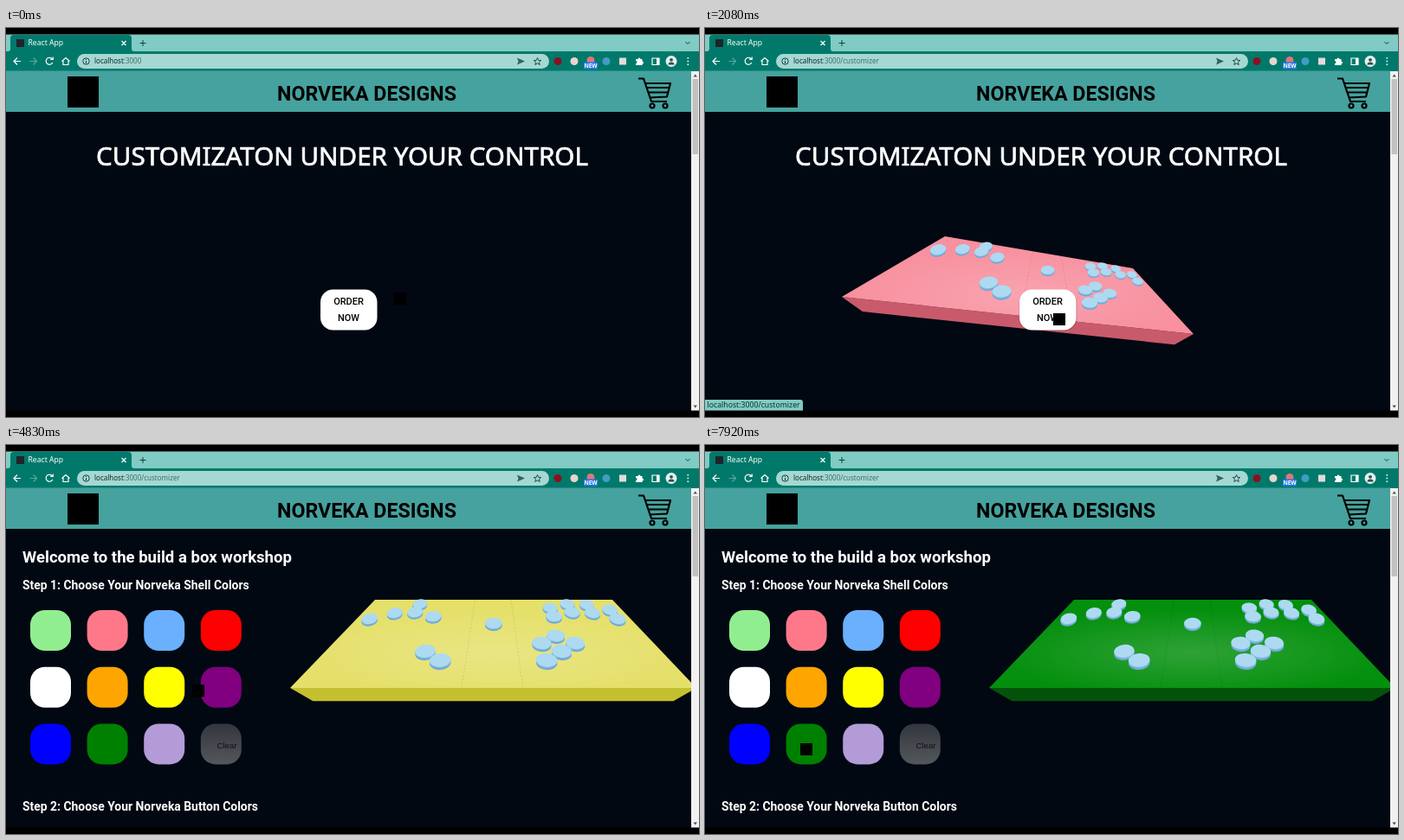
Recreate the animation shown at these times as an HTML page. Size 800 px wide and 450 px high, loop 8 s.

```html
<!DOCTYPE html>
<html lang="en">
<head>
<meta charset="utf-8">
<title>Customizer demo</title>
<style>
html, body { margin: 0; height: 100%; overflow: hidden; background: #000 }
svg { display: block; width: 100vw; height: 100vh }
.ui { font-family: "Noto Sans", sans-serif }
.head { font: 700 13.92px Roboto, sans-serif; fill: #fff }
.order { font: 500 11px Roboto, sans-serif; text-anchor: middle }
.hero { font: 29.6px "Noto Sans", sans-serif; text-anchor: middle; fill: #fff; stroke: #fff; stroke-width: .7 }
.line { fill: none; stroke: #fff; stroke-width: 1.2 }
</style>
</head>
<body>
<svg viewBox="0 0 800 450">
  <defs>
    <linearGradient id="grey" x2="0" y2="1"><stop stop-color="#33363c"/><stop offset="1" stop-color="#54575c"/></linearGradient>
    <radialGradient id="glow" cy=".6"><stop stop-color="#fff" stop-opacity=".17"/><stop offset="1" stop-color="#fff" stop-opacity="0"/></radialGradient>
    <clipPath id="page"><path d="M0 97H791V443H0z"/></clipPath>
  </defs>

  <!-- browser -->
  <path fill="#80cbc4" d="M0 7.500H800V28H0z"/>
  <path fill="#00796b" d="M0 27H800V50H0zM2 27q3 0 3-3V12q0-4 4-4H141q4 0 4 4v12q0 3 3 3z"/>
  <rect x="12" y="13" width="9" height="9" fill="#20232a"/>
  <g class="ui">
    <text x="25.500" y="20.300" font-size="8.600" fill="#fff">React App</text>
    <rect x="82" y="30" width="545" height="17" rx="8.500" fill="#a5d8d3"/>
    <text x="102" y="41.300" font-size="8" fill="#0b2b28">localhost<tspan fill="#41706b">:3000<tspan id="path">/customizer</tspan></tspan></text>
  </g>
  <path class="line" d="M133.500 15l5 5m0-5l-5 5M17 38.500H9m4-4l-4 4 4 4M53.500 36a4 4 0 1 0 .3 4M54.200 33.500v3h-3M64.500 38.500l4.500-4 4.500 4M66 38v4.500h6V38"/>
  <path class="line" opacity=".35" d="M27.500 38.500h8m-4-4l4 4-4 4"/>
  <g fill="none" stroke="#17403c">
    <path d="M154.500 17.500h7m-3.500-3.500v7M784.500 16l2.500 2.500 2.500-2.500M92.500 38v3m0-5v1"/>
    <circle cx="92.500" cy="38.500" r="3.700"/>
    <path stroke-width=".9" d="M613.500 34.500l1.200 2.800 3 .2-2.300 2 .8 3-2.700-1.600-2.700 1.600.8-3-2.300-2 3-.2z"/>
  </g>
  <path fill="#35635f" d="M590 34.500l9 4-9 4 1.500-4z"/>
  <circle cx="637" cy="38.500" r="4.500" fill="#8c1020"/>
  <circle cx="656" cy="38.500" r="4.500" fill="#e8d5cd"/>
  <circle cx="675" cy="37.500" r="4.500" fill="#dc7777"/>
  <rect x="667" y="39.500" width="16" height="8" rx="1" fill="#2878e8"/>
  <text x="675" y="46" font-size="6.500" font-weight="700" text-anchor="middle" fill="#fff" class="ui">NEW</text>
  <circle cx="693" cy="38.500" r="4.500" fill="#439bc4"/>
  <rect x="708" y="34.500" width="8" height="8" fill="#e5d9dc"/>
  <path fill="#fff" d="M727 36h2.500a1.500 1.500 0 0 1 3 0h2v2.500a1.500 1.500 0 0 1 0 3V43h-7.500v-2a1.500 1.500 0 0 0 0-3z"/>
  <path class="line" d="M746 35h8v7.500h-8z"/><path fill="#fff" d="M751 35h3v7h-3z"/>
  <circle cx="768" cy="38.500" r="6.500" fill="#e6eeee"/>
  <path fill="#27524e" d="M764.500 42.500q0-3 3.500-3t3.500 3z"/><circle cx="768" cy="36.800" r="1.900" fill="#27524e"/>
  <path fill="#fff" d="M786.500 34h1.600v1.600h-1.600zm0 3.700h1.600v1.600h-1.600zm0 3.700h1.600v1.600h-1.600z"/>

  <!-- page -->
  <path fill="#010812" d="M0 50H791V442.500H0z"/>
  <path fill="#45a29e" d="M0 49.500H791V97H0z"/>
  <rect x="71" y="56" width="36" height="36"/>
  <text x="416.500" y="83.500" text-anchor="middle" font-family="Roboto, sans-serif" font-weight="700" font-size="23.200">NORVEKA DESIGNS</text>
  <g fill="none" stroke="#000" stroke-width="2.200" stroke-linejoin="round">
    <path d="M730 58.500h6l9 26.500h18M738 64h29l-4 15.500-20 1M739.500 69h26M741 74.500h23.500"/>
    <circle cx="746" cy="90" r="2.500"/><circle cx="761" cy="90" r="2.500"/>
  </g>
  <path fill="#f1f1f1" d="M791 50H800V442.500H791z"/>
  <rect id="thumb" x="792.500" y="59" width="6.500" fill="#c1c1c1"/>
  <path fill="#505050" d="M793.500 56.500l2.200-3 2.200 3zM793.500 436.500l2.200 3 2.200-3z"/>

  <text id="hero" class="hero" x="388" y="158.500">CUSTOMIZATON UNDER YOUR CONTROL</text>
  <g id="model" clip-path="url(#page)"></g>
  <g id="button">
    <rect x="362.500" y="303.500" width="67" height="47" rx="15" opacity=".2"/>
    <rect x="363" y="302.500" width="65.500" height="47" rx="14.500" fill="#fff"/>
    <text class="order" x="395.500" y="320">ORDER</text>
    <text class="order" x="395.500" y="339">NOW</text>
  </g>
  <g id="shop" class="head">
    <text x="19" y="136.300" font-size="18.560">Welcome to the build a box workshop</text>
    <text x="19" y="166.500">Step 1: Choose Your Norveka Shell Colors</text>
    <g id="swatches"></g>
    <text x="255" y="350.500" text-anchor="middle" fill="#111" style="font:9.600px Liberation Sans,sans-serif">Clear</text>
    <text x="19" y="423">Step 2: Choose Your Norveka Button Colors</text>
  </g>
  <g id="status">
    <path fill="#80cbc4" d="M0 430H110q3 0 3 3V442.500H0z"/>
    <text x="2.500" y="439.300" class="ui" font-size="8.700" fill="#10302d">localhost:3000/customizer</text>
  </g>
  <rect id="cursor" width="14" height="14"/>
</svg>
<script>
const $ = id => document.getElementById(id);
const LOOP = 8000, STEP = 1000 / 12;
const show = (id, on) => $(id).style.display = on ? '' : 'none';
const mix = (p, q, k) => p.map((v, i) => v + (q[i] - v) * k);

const colors = ['#90ee90', '#ff788a', '#6bafff', '#f00', '#fff', 'orange', '#ff0', 'purple',
  '#00f', 'green', '#b39bd8', 'url(#grey)'];
$('swatches').innerHTML = colors.map((c, i) =>
  `<rect x="${28 + i % 4 * 65.6}" y="${191 + (i >> 2) * 65.7}" width="47" height="47" rx="17" fill="${c}"/>`).join('');

// shell: start time, top, front
const shells = [
  [0, '#f8909f', '#c95a6b'], [4250, '#e5e06a', '#c5c02f'],
  [5580, '#960098', '#4e0052'], [7920, '#048f0d', '#03530a']];

// top corners clockwise from back left, then the point where the upright edges meet
const bench = [[426, 179], [700, 179], [797, 281], [328, 281], [562, 416]];
const turnFrom = [[279, 246], [503, 264], [580, 345], [180, 328], [380, 440]];
const turnTo = [[277, 241], [494, 278], [564, 354], [158, 311], [370, 462]];

// button layout on the unit square: centre, two finger arcs, two thumb rows
const ROW = .138, caps = [[.5, .394]];
for (let i = 0; i < 4; i++) {
  const u = .277 - .076 * i, v = .225 + .038 * (i - 1.35) ** 2;
  caps.push([u, v], [1 - u, v], [1 - u, v - ROW]);
  if (i === 1) caps.push([u, v - ROW]);
}
for (let i = 0; i < 3; i++) {
  const u = .35 - .052 * i, v = .797 - .083 * i;
  if (i < 2) caps.push([u, v], [1 - u, v], [1 - u, v - .165]);
  else caps.push([1 - u, v]);
}
caps.sort((a, b) => a[1] - b[1]);

// cursor: time, x, y
const track = [[0, 448, 306], [1080, 422, 313], [1700, 402, 330], [2420, 402, 330], [3580, 232, 256],
  [4080, 159, 279], [4250, 159, 279], [5250, 255, 276], [5580, 244, 276], [6000, 227, 316],
  [7500, 110, 345], [LOOP, 110, 345]];

// perspective map from the unit square to a quad
function project([[x0, y0], [x1, y1], [x2, y2], [x3, y3]]) {
  const ax = x1 - x2, ay = y1 - y2, bx = x3 - x2, by = y3 - y2;
  const sx = x0 - x1 + x2 - x3, sy = y0 - y1 + y2 - y3, den = ax * by - bx * ay;
  const g = (sx * by - bx * sy) / den, h = (ax * sy - sx * ay) / den;
  return (u, v) => {
    const w = 1 + g * u + h * v;
    return [(x0 + (x1 - x0 + g * x1) * u + (x3 - x0 + h * x3) * v) / w,
      (y0 + (y1 - y0 + g * y1) * u + (y3 - y0 + h * y3) * v) / w];
  };
}

function drawModel(corners, [, top, front]) {
  const [bl, br, fr, fl, foot] = corners, map = project(corners);
  const poly = (points, fill) => `<polygon points="${points.join(' ')}" fill="${fill}"/>`;
  const seam = u => `<path d="M${map(u, 0)}L${map(u, 1)}" stroke="#000" stroke-opacity=".1" stroke-dasharray="2 2"/>`;
  const cap = ([u, v]) => {
    const [x, y] = map(u, v), r = map(u + .03, v)[0] - x, tilt = (u - .5) * 29;
    const disc = (dy, fill) =>
      `<ellipse rx="${r}" ry="${r * .64}" fill="${fill}" transform="translate(${x} ${y + dy * r}) rotate(${tilt})"/>`;
    return disc(.18, '#6fa9d6') + disc(0, '#85bce2') + disc(-.1, '#addaf1');
  };
  const face = [bl, br, fr, fl];
  return poly([fl, fr, mix(fr, foot, .113), mix(fl, foot, .113)], front) +
    poly(face, top) + poly(face, 'url(#glow)') + seam(.422) + seam(.573) + caps.map(cap).join('');
}

function draw(time) {
  const t = Math.floor((time % LOOP + 5) / STEP) * STEP + 1;
  const home = t < 2165;
  for (const id of ['hero', 'button']) show(id, home);
  show('shop', !home);
  show('path', t > 1999);
  show('status', t > 1330 && t < 2500);
  $('thumb').setAttribute('height', home ? 87 : 93);

  const loaded = home ? t > 249 : t > 2415;
  const corners = home ? turnFrom.map((p, i) => mix(p, turnTo[i], (t - 1080) / 1000)) : bench;
  const shell = shells.filter(s => s[0] <= t + 5).pop();
  $('model').innerHTML = loaded ? drawModel(corners, shell) : '';

  const i = track.findIndex(p => p[0] > t), a = track[i - 1], b = track[i];
  const [, x, y] = mix(a, b, (t - a[0]) / (b[0] - a[0]));
  $('cursor').setAttribute('x', x);
  $('cursor').setAttribute('y', y);
}

const begin = performance.now();
function tick() {
  draw(performance.now() - begin);
  requestAnimationFrame(tick);
}
tick();
</script>
</body>
</html>
```
